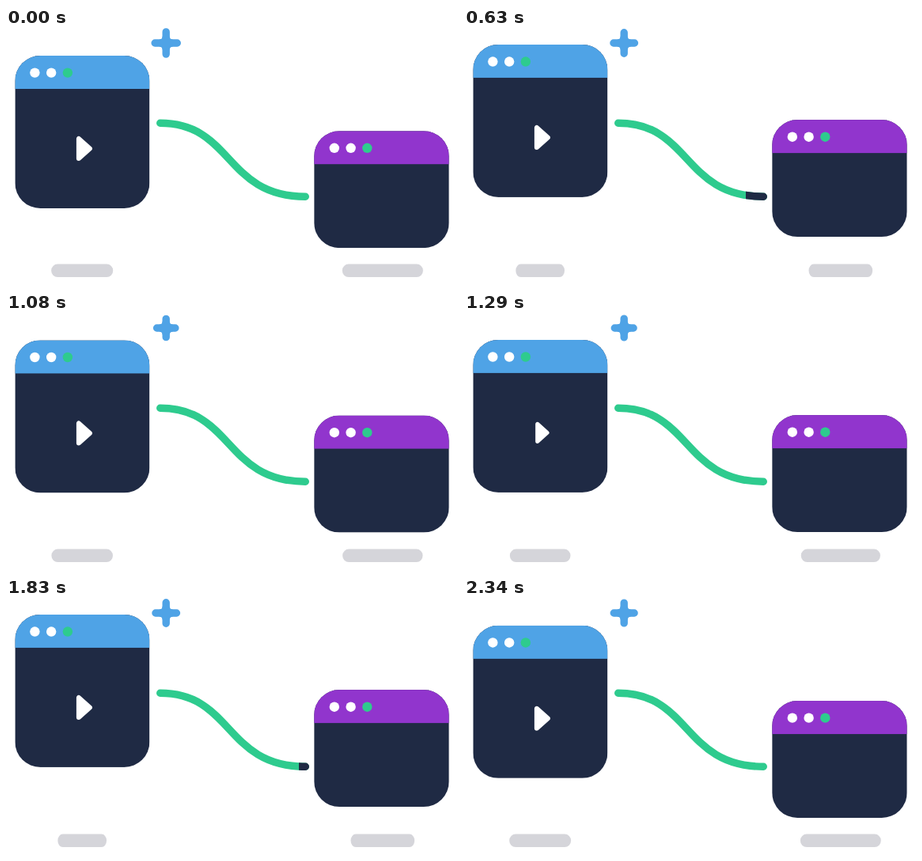
These frames come from a looping animation (571x325 px, 2.37 s). An HTML page:

```html
<!DOCTYPE html>
<html lang="en">
<head>
<meta charset="utf-8">
<title>Connected windows</title>
<style>
  html, body { margin: 0; width: 100%; height: 100%; overflow: hidden; background: #fff; }
  svg { display: block; width: 100%; height: 100%; }
</style>
</head>
<body>
<svg viewBox="0 0 571 325" xmlns="http://www.w3.org/2000/svg">
  <defs>
    <clipPath id="frameA"><rect width="170" height="193" rx="32"/></clipPath>
    <clipPath id="frameB"><rect width="170.5" height="148" rx="32"/></clipPath>
    <clipPath id="pulse"><rect id="pulseBox" y="100" width="42" height="140"/></clipPath>
    <path id="wire" d="M194.7 120.3C287 120.3 276 213.2 378.3 213.2" fill="none" stroke-width="9.4" stroke-linecap="round"/>
    <g id="dots">
      <circle cx="25" cy="21.6" r="6.2" fill="#fff"/>
      <circle cx="45.8" cy="21.6" r="6.2" fill="#fff"/>
      <circle cx="66.5" cy="21.6" r="6.2" fill="#2ecb8e"/>
    </g>
  </defs>

  <g fill="#d5d5da">
    <g id="shadeA"><rect x="-39" y="298.6" width="78" height="16.4" rx="8"/></g>
    <g id="shadeB"><rect x="-51" y="298.6" width="102" height="16.4" rx="8"/></g>
  </g>

  <use href="#wire" stroke="#2ecb8e"/>
  <g clip-path="url(#pulse)"><use href="#wire" stroke="#1f2a44"/></g>

  <g id="winA">
    <g clip-path="url(#frameA)">
      <rect width="170" height="193" fill="#1f2a44"/>
      <rect width="170" height="42" fill="#4fa3e6"/>
      <circle id="ripple" cx="84.6" cy="117.6" fill="#fff"/>
    </g>
    <use href="#dots"/>
    <path id="play" d="M-7 -12.5V12.5L7 0Z" fill="#fff" stroke="#fff" stroke-width="6" stroke-linejoin="round"/>
  </g>

  <g id="winB">
    <g clip-path="url(#frameB)">
      <rect width="170.5" height="148" fill="#1f2a44"/>
      <rect width="170.5" height="42" fill="#9135cd"/>
    </g>
    <use href="#dots" x="0.6"/>
  </g>

  <g transform="translate(202.2 19)" fill="#4fa3e6">
    <path id="cross" fill="none" stroke="#4fa3e6" stroke-width="9.4" stroke-linecap="round"/>
    <path d="M4.7 -8.2Q4.7 -4.7 8.2 -4.7V4.7Q4.7 4.7 4.7 8.2H-4.7Q-4.7 4.7 -8.2 4.7V-4.7Q-4.7 -4.7 -4.7 -8.2Z"/>
  </g>
</svg>
<script>
const LOOP = 2370, STEP = 30, FLOAT = 1200, CLICK = 1140, BEAT = 600;
const $ = id => document.getElementById(id);
const clamp = v => Math.min(1, Math.max(0, v));
const span = (t, a, b) => clamp((t - a) / (b - a));

// Cubic easing with flat ends: handles (x1, 0) and (x2, 1).
function ease(x1, x2) {
  return x => {
    let lo = 0, hi = 1;
    for (let i = 0; i < 24; i++) {
      const s = (lo + hi) / 2, r = 1 - s;
      if (3 * r * r * s * x1 + 3 * r * s * s * x2 + s * s * s < x) lo = s;
      else hi = s;
    }
    return lo * lo * (3 - 2 * lo);
  };
}
const liftEase = ease(0.33, 0.4);
const shadeEase = ease(0.33, 0.3);

function upDown(t, fn) {
  const u = (t % FLOAT) / (FLOAT / 2);
  return u < 1 ? fn(u) : 1 - fn(u - 1);
}

const place = (id, value) => $(id).setAttribute("transform", value);

function draw(t) {
  const lift = 14.2 * upDown(t, liftEase);
  place("winA", `translate(11.4 ${35 - lift})`);
  place("winB", `translate(389.2 ${130.2 - lift})`);

  const shade = 1 - 0.212 * upDown(t, shadeEase);
  place("shadeA", `translate(96.2 0) scale(${shade} 1)`);
  place("shadeB", `translate(475.8 0) scale(${shade} 1)`);

  // The cross shrinks and grows with a sharp turn at full size.
  const b = 1 - Math.abs(((t + 8) % BEAT) / (BEAT / 2) - 1);
  const arm = 14.65 + 4.35 * (1 - b) ** 2 - 4.7;
  $("cross").setAttribute("d", `M${-arm} 0H${arm}M0 ${-arm}V${arm}`);

  const c = t % CLICK;
  const size = 1 - 0.52 * (c < 240 ? span(c, 120, 240) : 1 - span(c, 240, 345));
  place("play", `translate(87.5 117.5) scale(${size})`);

  const r = span(c, 150, 322);
  $("ripple").setAttribute("r", 70 * r);
  $("ripple").setAttribute("opacity", 0.34 * (1 - r));

  const rest = 1 - span(c, 230, 845);
  $("pulseBox").setAttribute("x", 385 - 237 * rest * rest);
}

const start = performance.now();
function tick() {
  const t = (performance.now() - start) % LOOP;
  draw(Math.floor(t / STEP) * STEP);
  requestAnimationFrame(tick);
}
draw(0);
requestAnimationFrame(tick);
</script>
</body>
</html>
```
